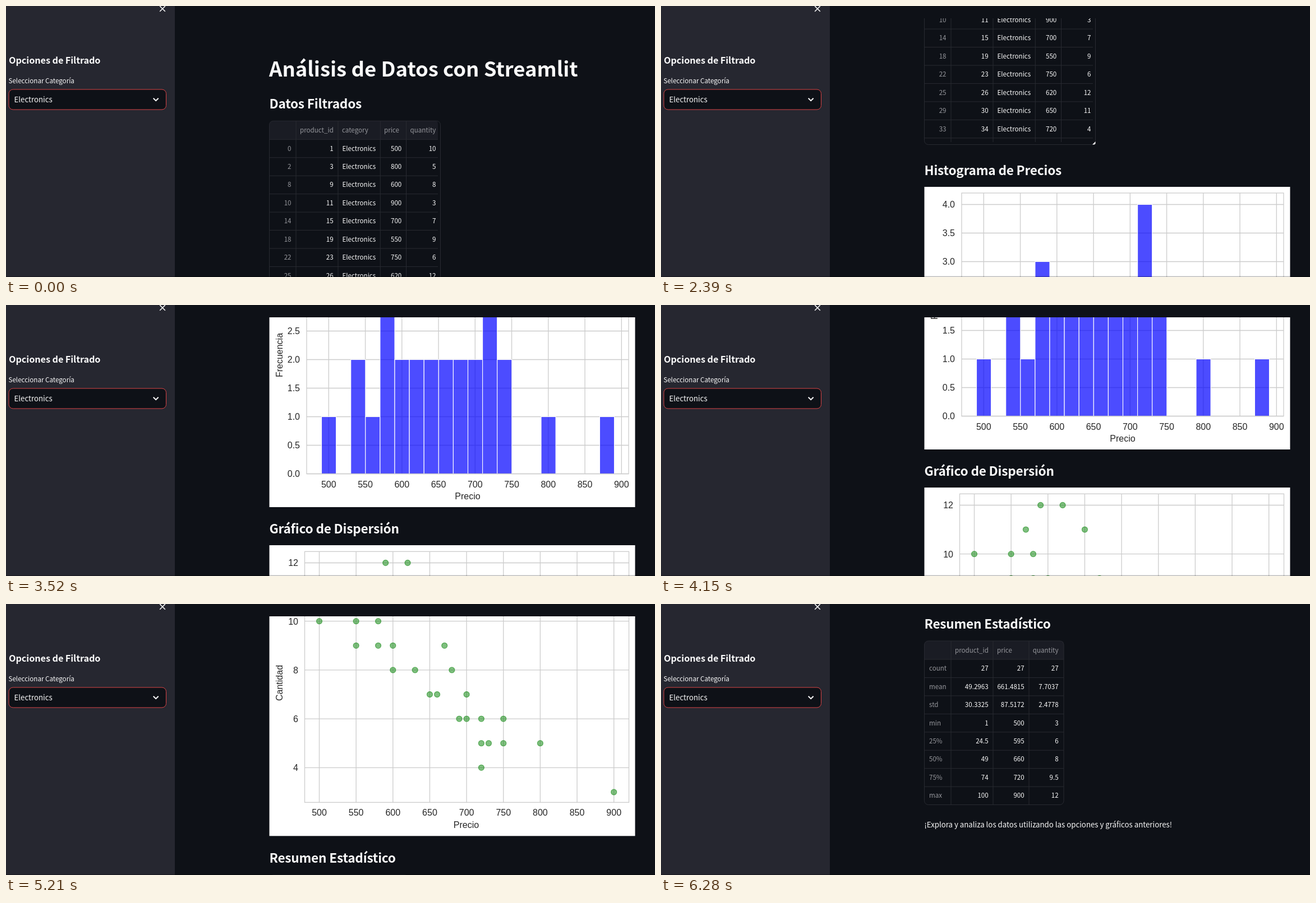
Recreate the animation shown at these times as an HTML page. Size 1157x484 px, loop 7270 ms.

```html
<!DOCTYPE html>
<html lang="es">
<head>
<meta charset="utf-8">
<title>Análisis de Datos</title>
<style>
  html, body { margin: 0; width: 100%; height: 100%; overflow: hidden; background: #0e1117; }
  svg { display: block; width: 1157px; height: 484px; }
  text { font-family: "Noto Sans CJK JP", "Noto Sans CJK SC", "Noto Sans CJK KR", "Noto Sans CJK", "Noto Sans", sans-serif; fill: #fafafa; }
  .h1 { font-size: 36.5px; font-weight: 700; }
  .h2 { font-size: 22.6px; font-weight: 600; letter-spacing: -.2px; }
  .h3 { font-size: 16.3px; font-weight: 600; letter-spacing: -.1px; }
  .body { font-size: 13.25px; }
  .small { font-size: 11.6px; }
  .faded { font-size: 11.6px; fill: #96979c; }
  .plot { font: 16px "Liberation Sans", Arial, sans-serif; fill: #262626; }
  .grid { fill: none; stroke: #ccc; stroke-width: 1.3; }
  .rule { fill: none; stroke: #282a31; stroke-width: 1; }
  .bar { fill: #00f; fill-opacity: .7; stroke: #fff; stroke-width: 1.1; }
  .dot { fill: green; fill-opacity: .5; stroke: green; stroke-opacity: .5; stroke-width: 1.3; }
</style>
</head>
<body>
<svg viewBox="0 0 1157 484">
  <defs><clipPath id="view"><rect x="301" y="22" width="856" height="462"/></clipPath></defs>
  <rect width="1157" height="484" fill="#0e1117"/>
  <rect width="301" height="484" fill="#262730"/>
  <path d="M274.2 .2l9.6 9.6m0-9.6l-9.6 9.6" stroke="#fafafa" stroke-width="1.6" fill="none"/>
  <text class="h3" x="5" y="103">Opciones de Filtrado</text>
  <text class="small" x="4.5" y="138">Seleccionar Categoría</text>
  <rect x="5" y="149" width="280.5" height="36" rx="7.5" fill="#0e1117" stroke="#d94446"/>
  <text class="body" x="14.5" y="171.7">Electronics</text>
  <path d="M262.7 164.7l4.5 4.5 4.5-4.5" stroke="#fafafa" stroke-width="2" fill="none"/>
  <g clip-path="url(#view)"><g id="page"></g></g>
  <rect y="482.5" width="1157" height="1.5" opacity=".25"/>
</svg>
<script>
const NS = "http://www.w3.org/2000/svg";
const page = document.getElementById("page");
const ROW = 32.45;

function add(parent, tag, attrs, content) {
  const el = document.createElementNS(NS, tag);
  for (const key in attrs) el.setAttribute(key, attrs[key]);
  if (content !== undefined) el.textContent = content;
  parent.appendChild(el);
  return el;
}
const text = (g, cls, x, y, content, anchor = "start") =>
  add(g, "text", { class: cls, x, y, "text-anchor": anchor }, content);
const path = (g, cls, d) => add(g, "path", { class: cls, d });
const section = y => add(page, "g", { transform: `translate(0 ${y})` });

// A column is [text x, anchor, class, heading x, heading].
function table(g, { top, right, inner, bottom, cellEnd, edges, columns, rows, lines }) {
  add(g, "path", {
    d: `M469.5 ${top + 33}V${top + 7}q0-7 7-7H${inner - 5}q5 0 5 5V${top + 33}z`, fill: "#1a1c24"
  });
  for (let i = 0; i < lines; i++) path(g, "rule", `M469.5 ${top + 33 + i * ROW}H${inner}`);
  for (const x of edges) path(g, "rule", `M${x} ${top}V${cellEnd}`);
  add(g, "rect", {
    class: "rule", x: 469.5, y: top, width: right - 469.5, height: bottom - top, rx: 7
  });
  columns.forEach(([x, anchor, cls, headX, head], c) => {
    if (head) text(g, "faded", headX, top + 20.7, head);
    rows.forEach((row, r) => text(g, cls, x, top + 53.2 + r * ROW, row[c], anchor));
  });
}

function axes(g, { top, bottom, left, right, axisTop, axisBottom, x500, dx, yTicks, yLabelX, yTitle, yMid, xMid }) {
  add(g, "rect", { x: 469.5, y: top, width: 652, height: bottom - top, fill: "#fff" });
  for (let i = 0; i < 9; i++) {
    const x = x500 + i * dx;
    path(g, "grid", `M${x} ${axisTop}V${axisBottom}`);
    text(g, "plot", x, axisBottom + 24, 500 + 50 * i, "middle");
  }
  for (const [label, y] of yTicks) {
    path(g, "grid", `M${left} ${y}H${right}`);
    text(g, "plot", yLabelX, y + 5.8, label, "end");
  }
  text(g, "plot", xMid, axisBottom + 45.3, "Precio", "middle");
  add(g, "text", {
    class: "plot", "text-anchor": "middle", transform: `translate(493.3 ${yMid}) rotate(-90)`
  }, yTitle);
  return () => add(g, "rect", {
    class: "grid", x: left, y: axisTop, width: right - left, height: axisBottom - axisTop
  });
}

function buildData() {
  const g = section(0);
  text(g, "h1", 469, 126, "Análisis de Datos con Streamlit");
  text(g, "h2", 469.5, 183, "Datos Filtrados");
  const items = [[0, 500, 10], [2, 800, 5], [8, 600, 8], [10, 900, 3], [14, 700, 7],
    [18, 550, 9], [22, 750, 6], [25, 620, 12], [29, 650, 11], [33, 720, 4]];
  table(g, {
    top: 205.3, right: 774.5, inner: 770, bottom: 574.5, cellEnd: 570, edges: [517, 592, 667.3, 713.5], lines: 11,
    columns: [
      [508.5, "end", "faded"],
      [583.7, "end", "small", 524, "product_id"],
      [599.5, "start", "small", 599, "category"],
      [705.3, "end", "small", 674, "price"],
      [766.5, "end", "small", 720.5, "quantity"]
    ],
    rows: items.map(([id, price, qty]) => [id, id + 1, "Electronics", price, qty])
  });
  add(g, "path", { d: "M774.5 569v4l-2 1.5h-3.5z", fill: "#fff" });
}

function buildHistogram() {
  const g = section(516);
  text(g, "h2", 469.5, 113, "Histograma de Precios");
  const y = v => 573.5 - 102 * v;
  const yTicks = [...Array(9).keys()].map(i => [(i / 2).toFixed(1), y(i / 2)]);
  const frame = axes(g, {
    top: 134, bottom: 633, left: 536, right: 1110, axisTop: 145, axisBottom: 573.5,
    x500: 575.3, dx: 65.25, yTicks, yLabelX: 524, yTitle: "Frecuencia", yMid: 361.5, xMid: 823
  });
  [..."10213222222420010001"].forEach((n, i) => {
    if (+n) add(g, "rect", { class: "bar", x: 562.5 + 26.1 * i, y: y(n), width: 26.1, height: 102 * n });
  });
  frame();
}

function buildScatter() {
  const g = section(1103);
  text(g, "h2", 469.5, 93, "Gráfico de Dispersión");
  const y = v => 145.5 + 43.6 * (12 - v);
  const frame = axes(g, {
    top: 114, bottom: 616.3, left: 532.5, right: 1110.5, axisTop: 125.3, axisBottom: 556.3,
    x500: 558.5, dx: 65.65, yTicks: [12, 10, 8, 6, 4].map(v => [v, y(v)]),
    yLabelX: 521, yTitle: "Cantidad", yMid: 343, xMid: 820.5
  });
  const prices = {
    12: [590, 620], 11: [570, 650], 10: [500, 550, 580], 9: [550, 580, 600, 670],
    8: [600, 630, 680], 7: [650, 660, 700], 6: [690, 700, 720, 750],
    5: [720, 730, 750, 800], 4: [720], 3: [900]
  };
  frame();
  for (const qty in prices)
    for (const p of prices[qty])
      add(g, "circle", { class: "dot", cx: 558.5 + (p - 500) * 1.313, cy: y(qty), r: 5 });
}

function buildSummary() {
  const g = section(1723);
  text(g, "h2", 469.5, 44, "Resumen Estadístico");
  table(g, {
    top: 66, right: 718, inner: 718, bottom: 358.5, cellEnd: 358.5, edges: [517, 592, 656], lines: 8,
    columns: [
      [478, "start", "faded"],
      [583.7, "end", "small", 524, "product_id"],
      [647.7, "end", "small", 599, "price"],
      [708.7, "end", "small", 662.7, "quantity"]
    ],
    rows: [
      ["count", 27, 27, 27], ["mean", "49.2963", "661.4815", "7.7037"],
      ["std", "30.3325", "87.5172", "2.4778"], ["min", 1, 500, 3], ["25%", 24.5, 595, 6],
      ["50%", 49, 660, 8], ["75%", 74, 720, 9.5], ["max", 100, 900, 12]
    ]
  });
  text(g, "body", 469.5, 398.5, "¡Explora y analiza los datos utilizando las opciones y gráficos anteriores!");
}

buildData();
buildHistogram();
buildScatter();
buildSummary();

// Wheel scrolls: first step, last step (ms), steps, target, phase of the first step.
const LOOP = 7270;
const scrolls = [
  [990, 1160, 4, 100, .5], [1630, 1920, 6, 300, .31], [2330, 2690, 7, 500, .5],
  [3160, 3570, 8, 800, 1.13], [4040, 4450, 8, 1100, .887], [4680, 4980, 6, 1300, .39],
  [5210, 5570, 7, 1601, .5], [6040, 6280, 5, 1723, .5]
];

function scrollAt(t) {
  let y = 0;
  for (const [start, end, steps, target, phase] of scrolls) {
    if (t < start) break;
    const gap = (end - start) / (steps - 1);
    const k = Math.min(steps - 1, Math.floor((t - start + 8) / gap));
    const u = (k + phase) / (steps - 1 + phase);
    y += (target - y) * u * u * (3 - 2 * u);
  }
  return Math.round(y);
}

let origin;
function draw(now) {
  origin ??= now;
  page.setAttribute("transform", `translate(0 ${-scrollAt((now - origin) % LOOP)})`);
  requestAnimationFrame(draw);
}
requestAnimationFrame(draw);
</script>
</body>
</html>
```
